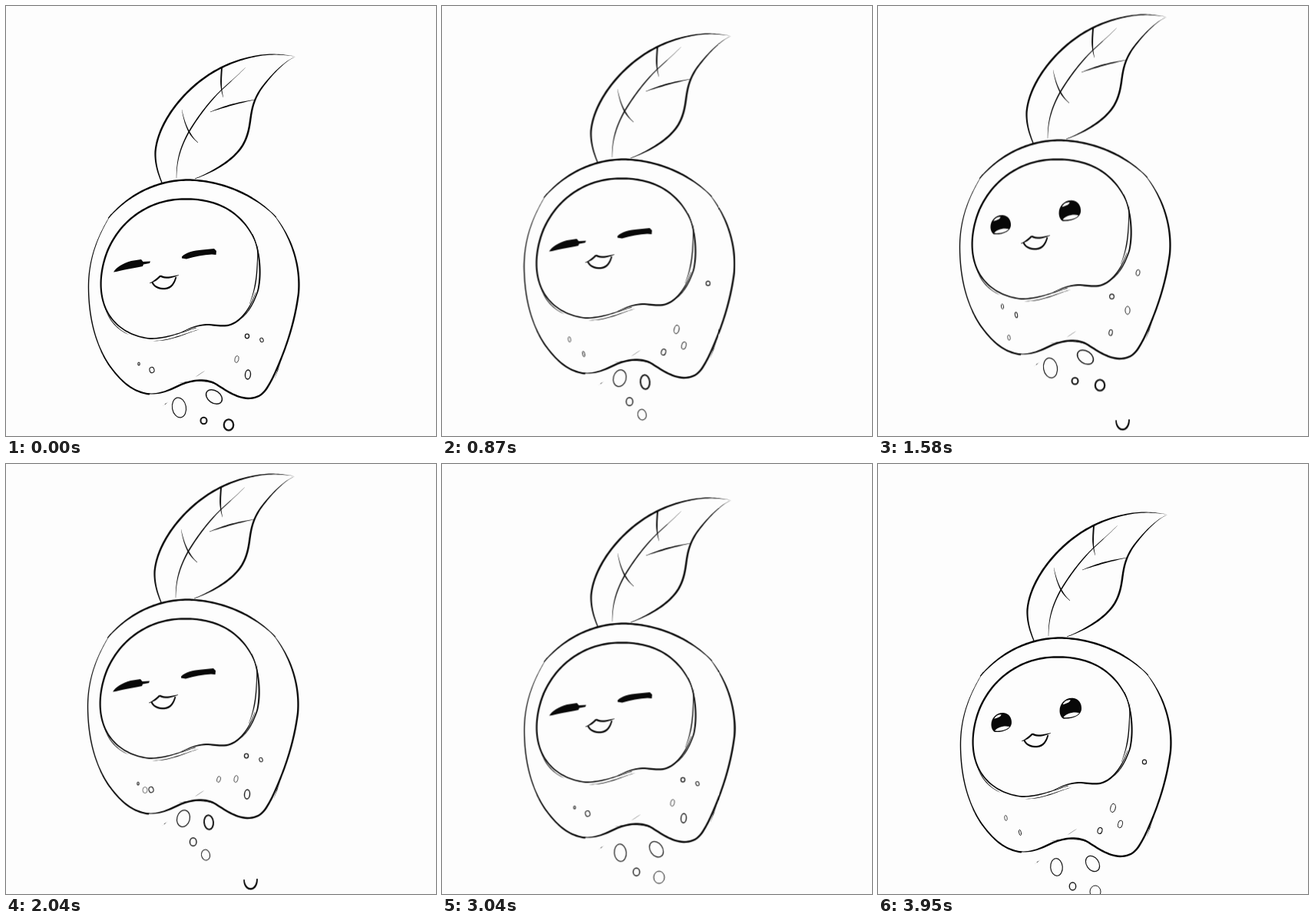
These frames come from a looping animation (560x560 px, 4000 ms). An HTML page:

```html
<!DOCTYPE html>
<html lang="en">
<head>
<meta charset="utf-8">
<title>Bobbing sprout</title>
<style>
  html, body { margin: 0; width: 100%; height: 100%; overflow: hidden; background: #fdfdfd; }
  svg { display: block; width: 100vw; height: 100vh; }
  #sprout { animation: bob 4s infinite; }
  @keyframes bob {
    0% { transform: translate(0, 0); animation-timing-function: cubic-bezier(.364, 0, .636, 1); }
    43% { transform: translate(-1px, -52.5px); animation-timing-function: cubic-bezier(.364, 0, .636, 1); }
    98.7%, 100% { transform: translate(0, 0); }
  }

  .ink { fill: #080808; }
  .ring { fill: none; stroke: #181818; }
  .pose { opacity: 0; animation: 4s step-end infinite; }

  /* freckles: four drawings a second */
  .freckles { animation-duration: 1s; }
  #specksA { animation-name: specksA; }
  #specksB { animation-name: specksB; }
  #specksC { animation-name: specksC; }
  #specksD { animation-name: specksD; }
  @keyframes specksA { 0% { opacity: 1 } 12.5%, 100% { opacity: 0 } }
  @keyframes specksB { 0%, 75%, 100% { opacity: 0 } 35% { opacity: 1 } }
  @keyframes specksC { 0%, 35%, 100% { opacity: 0 } 12.5% { opacity: 1 } }
  @keyframes specksD { 0% { opacity: 0 } 75%, 100% { opacity: 1 } }
  #specksExtra { animation-name: specksExtra; }
  @keyframes specksExtra { 0%, 52%, 100% { opacity: 0 } 50% { opacity: 1 } }

  /* falling bubbles */
  #wide { animation-name: wide; }
  #even { animation-name: even; }
  #close { animation-name: close; }
  @keyframes wide {
    0%, 32%, 64% { opacity: 1 }
    7.5%, 40%, 72%, 100% { opacity: 0 }
  }
  @keyframes close {
    0%, 22%, 56%, 89%, 100% { opacity: 0 }
    15%, 48%, 81% { opacity: 1 }
  }
  @keyframes even {
    0%, 15%, 32%, 48%, 64%, 81% { opacity: 0 }
    7.5%, 22%, 40%, 56%, 72%, 89%, 100% { opacity: 1 }
  }

  /* face */
  #shut { animation-name: shut; }
  #open { animation-name: open; }
  @keyframes shut {
    0%, 41%, 71%, 100% { opacity: 1 }
    32.5%, 62.5%, 91% { opacity: 0 }
  }
  @keyframes open {
    0%, 41%, 71% { opacity: 0 }
    32.5%, 62.5%, 91%, 100% { opacity: 1 }
  }
  #smile { animation-name: smile; }
  #grin { animation-name: grin; }
  @keyframes smile { 0%, 32.5%, 100% { opacity: 1 } 27.5% { opacity: 0 } }
  @keyframes grin { 0%, 32.5%, 100% { opacity: 0 } 27.5% { opacity: 1 } }
</style>
</head>
<body>
<svg viewBox="0 0 560 560">
  <g id="sprout">
    <g id="lines"></g>

    <g id="shut" class="pose ink">
      <path d="M140 346.5C143 341 152 335 163 332L176 330L178.5 333L188 332.5L187 335L179 336.5L178 339C172 340 164 342 157 343C150 344 145 346 140 346.5Z"/>
      <path d="M229 326.5C234 321 244 318.5 256 317.5L271 316L274 319L273.5 324L268 323.5C257 324 246 326 235 329.5L229 328.5Z"/>
    </g>
    <g id="open" class="pose">
      <g id="eye" transform="translate(160.5 336.5) scale(.93)">
        <path class="ink" d="M-14 3C-14 -6 -7 -14 3 -13.5C11 -13 15 -6 14.5 1C14 8 6 14 -9 13.5C-12 12 -14 8 -14 3Z"/>
        <path fill="#fdfdfd" d="M-10 -5C-8 -9 -5 -11 0 -11C0 -8.5 -4 -6.5 -10 -5Z"/>
        <path fill="#fdfdfd" d="M-9 11.8C-6 7 4 4 11.5 6C9 10 0 12.7 -9 11.8Z"/>
      </g>
      <use href="#eye" transform="translate(78 -43.5) scale(1.075)"/>
    </g>
    <g id="smile" class="pose"></g>
    <g id="grin" class="pose"></g>

    <g id="specksA" class="pose freckles"></g>
    <g id="specksB" class="pose freckles"></g>
    <g id="specksC" class="pose freckles"></g>
    <g id="specksD" class="pose freckles"></g>
    <g id="specksExtra" class="pose"></g>
    <g id="wide" class="pose"></g>
    <g id="even" class="pose"></g>
    <g id="close" class="pose"></g>
  </g>
</svg>
<script>
const WEIGHT = 1.12;

const add = (id, tag, attrs) => {
  const el = document.createElementNS('http://www.w3.org/2000/svg', tag);
  for (const key in attrs) el.setAttribute(key, attrs[key]);
  document.getElementById(id).append(el);
  return el;
};

// Pen stroke along a path; the widths are spread evenly over its length.
function ink(id, d, ...widths) {
  const path = add(id, 'path', { d, class: 'ink' });
  const length = path.getTotalLength();
  const steps = Math.ceil(length / 3);
  const left = [], right = [];
  for (let i = 0; i <= steps; i++) {
    const at = length * i / steps;
    const p = path.getPointAtLength(at);
    const a = path.getPointAtLength(Math.max(0, at - .5));
    const b = path.getPointAtLength(Math.min(length, at + .5));
    const pos = i / steps * (widths.length - 1);
    const k = Math.min(Math.floor(pos), widths.length - 2);
    const half = WEIGHT * (widths[k] + (widths[k + 1] - widths[k]) * (pos - k)) / 2;
    const size = Math.hypot(b.x - a.x, b.y - a.y) || 1;
    const nx = (a.y - b.y) / size * half, ny = (b.x - a.x) / size * half;
    left.push(`${(p.x + nx).toFixed(2)} ${(p.y + ny).toFixed(2)}`);
    right.unshift(`${(p.x - nx).toFixed(2)} ${(p.y - ny).toFixed(2)}`);
  }
  path.setAttribute('d', `M${left.concat(right).join('L')}Z`);
}

function ring(id, cx, cy, rx, ry, width = 1, turn = 0) {
  add(id, 'ellipse', { class: 'ring', cx, cy, rx, ry, 'stroke-width': width, transform: `rotate(${turn} ${cx} ${cy})` });
}

const line = (d, ...widths) => ink('lines', d, ...widths);

// leaf
line('M379 66C362 63 345 62 330 64.5C299 69.5 271 82 247.5 102C220 125 197 159 194.5 190C194 205 198 218 203 230', .1, 1.2, 2, 2.2, 2.2, 2.2, 2, 1.2);
line('M377 66C362 72 346 90 335 104C322 121 320 135 318 150C315 172 309 184 296 196C282 209 262 219 246 225', .1, 1.2, 2, 2.2, 2.2, 2, .5);
line('M222 224C222 201 227 185 237 166C249 145 267 122 281 109C293 98 304 88 312 80', .3, 1.2, 1.5, 1.3, .8, .1);
line('M281 81C280 95 279 106 283 119', 1.7, 1.7, .3);
line('M229 135C232 151 237 167 250 178', .2, .9, 1.5, .3);
line('M266 138C284 131 302 126 324 122', .3, 1.7, 1.4, .4);

// body
line('M133 276.5C160 245 197 226.5 238 226.5C280 227.5 322 244.5 352 275', 1, 2.1, 2.2, 2.2, 2.1, .7);
line('M137 271C119 300 107 330 107.5 368C108 408 117 441 134 467C150 490 166 503 187 505.5', .4, .9, 1.2, 1.3, 1.2, 1.7, 2);
line('M172 502C196 510 213 500 228 493C243 487 262 484 276 494C290 503 302 511 317 511C333 510 338 502 347 485C364 449 376 413 381 374C384 338 372 303 352 276L346 269', .4, 2.1, 2.1, 2.2, 2.1, 2, 2.1, 2.1, 1.8, .4);
line('M225 491C244 488 260 487 274 493', .2, .8, .2);
line('M247 483L259 475', .1, .3, .1);
line('M204 521L212 515', .1, .4, .1);
line('M350 485L358 463', .1, .7, .1);
line('M123 449C130 463 138 474 146 483', .1, .8, .1);

// hood opening
line('M329 325C326 297 306 273 284 262C268 254 250 251 232 251.5C186 251.5 147 280 131 322C122 347 121 372 129 392C137 412 156 429 186 433C207 434 228 425 248 419', .7, 1.9, 2.1, 2.1, 2.1, 2.1, 1.9, 1.5, 1.5, .5);
line('M222 428C240 419 250 415 265 415C275 416 282 417 289 416C306 412 318 394 325 373', .1, 1.4, 2, 2, 1.4, .4);
line('M321 297C331 320 333 350 328 371C322 388 315 402 302 410', .5, 1.8, 1.8, 1.3, .4);
line('M328 312C327 340 328 362 317 388', .3, 1.1, 1.3, .3);
line('M128 390C133 408 144 421 160 428', .2, .9, .2);
line('M191 436C212 437 232 427 252 421', .1, .9, .2);

// mouth
ink('smile', 'M187 361C193 359 198 355 201 351.5', .5, 1.9, 2);
ink('smile', 'M201 351.5C207 355 214 354 225 350.5', 2, 2.1, .6);
ink('smile', 'M190.5 360C193 366 200 368.5 207 368.2C216 367 219 361 221.5 353', 1.8, 2.1, 2.1, 1.5);
ink('grin', 'M186 361C192 359 199 356 203 351.5', .7, 1.8, 1.7);
ink('grin', 'M203 351.5C208 354 215 354 223 353L220 357', 1.7, 1.7, .8);
ink('grin', 'M192 359C196 363 201 365 206 364C212 363 215 359 217 354', 1.5, 1.8, 1.8, 1.3);

// freckles
ring('specksA', 173, 466, 1.2, 2, 1.1);
ring('specksA', 190, 474, 3, 3.7, 1.1, -15);
ring('specksA', 314, 430, 2.6, 2.8, 1.3);
ring('specksA', 333, 435, 2.1, 2.8, 1, -20);
ring('specksA', 300.5, 460, 2.5, 4.5, .7, 12);
ring('specksA', 315, 480, 3.5, 6, 1.4, 5);

ring('specksB', 163, 443, 1.5, 3.3, .9, -8);
ring('specksB', 181, 454, 1.6, 3.5, 1, -10);
ring('specksB', 171.5, 483.5, 1.7, 3.5, .7, -8);
ring('specksB', 339.5, 399, 2.5, 4, .9, 10);
ring('specksB', 305.5, 430, 2.9, 3.1, 1.1);
ring('specksB', 326, 448, 3.1, 5.2, .9);
ring('specksB', 304, 477, 2.2, 3.8, 1, 8);

ring('specksC', 169, 457, 1.9, 3, .8, -15);
ring('specksC', 184.5, 463.5, 2.9, 4, .9, -12);
ring('specksC', 317.5, 422.5, 2.5, 2.9, .9);
ring('specksC', 337.5, 425, 2.7, 1.8, 1, 25);
ring('specksC', 300, 452, 2.8, 4.6, 1.2, 8);
ring('specksC', 316.5, 471.5, 2.8, 5.4, .8, 8);

ring('specksD', 166.5, 461, 1.7, 3.5, .7, -8);
ring('specksD', 185, 480, 1.4, 3.7, .9, -12);
ring('specksD', 347, 388, 2.6, 2.9, 1.2);
ring('specksD', 306, 448, 3.2, 5.5, 1, 12);
ring('specksD', 315.5, 469, 2.9, 4.9, .9, 12);
ring('specksD', 289, 477.5, 2.9, 4, 1.1, 15);

ring('specksExtra', 182, 474.5, 3, 4, .6);
ring('specksExtra', 278, 460.5, 2.3, 4, .7, 15);

// bubbles
ring('wide', 225.5, 523, 9, 13, 1.2, -10);
ring('wide', 271, 509, 11.5, 8, 1.4, 35);
ring('wide', 257.5, 540, 4, 4.3, 2.1);
ring('wide', 290, 545.5, 6.2, 7.2, 2.3);

ring('even', 232.5, 525, 7.8, 11.3, 1.2, -5);
ring('even', 279.5, 520.5, 8, 11, 1.2, -35);
ring('even', 253.5, 550, 4.2, 5, 1.4);
ring('even', 283, 557, 7, 8, 1);

ring('close', 232, 511.5, 8.3, 11, 1.2, 15);
ring('close', 265, 516.5, 6, 9.3, 2, -5);
ring('close', 244.7, 542, 4.3, 5.3, 1.4);
ring('close', 261, 559, 5.5, 7, 1, -12);

line('M311 591C311 607 328 608 328 590', 1.4, 2.1, 2.1, 1.6);
</script>
</body>
</html>
```
